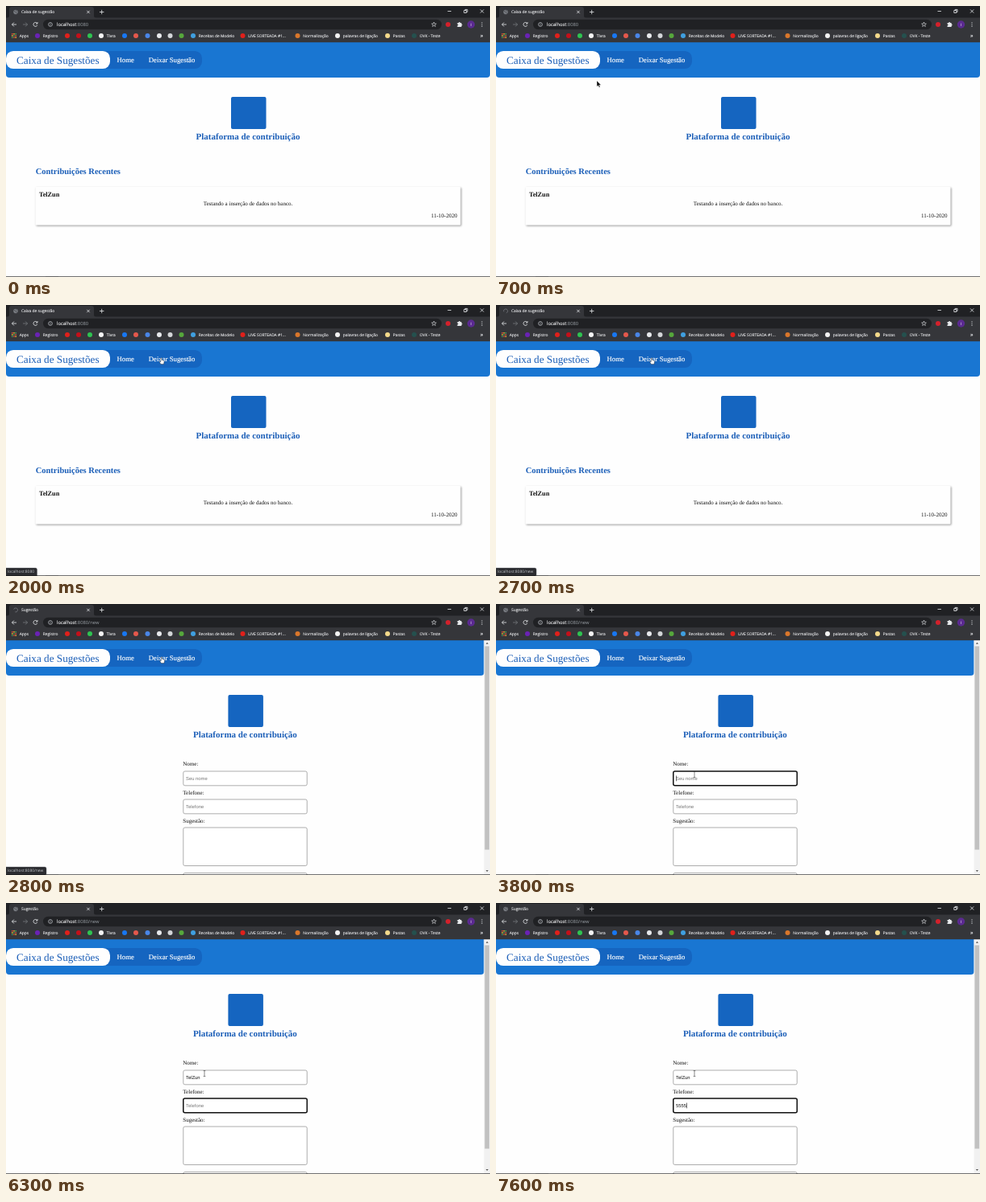
Recreate the animation shown at these times as an HTML page. Size 600 px wide and 337 px high, loop 8 s.

```html
<!DOCTYPE html>
<html lang="pt">
<head>
<meta charset="utf-8">
<style>
html, body { margin: 0; width: 100%; height: 100%; overflow: hidden; background: #fefefe; }
svg { display: block; width: 100%; height: 100%; }
text { font: 7.03px "Liberation Serif", "Times New Roman", serif; fill: #111; white-space: pre; text-rendering: geometricPrecision; }
.ui text { font: 4.9px "Open Sans", sans-serif; fill: #f1f2f4; stroke: #f1f2f4; stroke-width: .1; }
.ui .url { font-size: 5.8px; }
.ui .dim { fill: #9aa0a6; stroke: none; }
.line { fill: none; stroke: #e8eaed; stroke-width: .8; }
text.nav { font-size: 8.78px; fill: #fff; stroke: #fff; stroke-width: .15; }
text.brand { font-size: 13.2px; fill: #1c5fb8; }
text.title { font-size: 11px; font-weight: bold; fill: #1c5fb8; text-anchor: middle; }
text.sub { font-size: 10.5px; font-weight: bold; fill: #1c5fb8; }
text.name { font-size: 8.2px; font-weight: bold; }
.card { fill: #fefefe; filter: drop-shadow(1.5px 1.5px 1.2px #0006); }
.box { fill: #fff; stroke: #999; stroke-width: .8; }
.box.on { stroke: #101010; stroke-width: 1.5; }
text.val { font: 5.86px "Liberation Sans", Arial, sans-serif; fill: #111; }
text.val.empty { fill: #777; }
</style>
</head>
<body>
<svg viewBox="0 0 600 337" preserveAspectRatio="none">
  <rect width="600" height="337" fill="#fefefe"/>

  <!-- page header -->
  <path id="bar" fill="#1976d2"/>
  <rect x="110" y="55.9" width="133" height="22.2" rx="9" fill="#1565c0"/>
  <rect y="55.9" width="129" height="22.2" rx="9" fill="#fefefe"/>
  <text class="brand" x="13" y="71.6">Caixa de Sugestões</text>
  <text class="nav" x="137.5" y="70.4">Home</text>
  <text class="nav" x="176.7" y="70.4">Deixar Sugestão</text>
  <g id="hero">
    <rect x="279" y="113" width="43.5" height="40" rx="2" fill="#1565c0"/>
    <text class="title" x="300" y="166.3">Plataforma de contribuição</text>
  </g>

  <g id="home">
    <text class="sub" x="36.7" y="209">Contribuições Recentes</text>
    <rect class="card" x="36.5" y="225" width="527" height="47.5" rx="1"/>
    <text class="name" x="41" y="236.5">TelZun</text>
    <text x="300" y="248.4" text-anchor="middle">Testando a inserção de dados no banco.</text>
    <text x="559.5" y="263.4" text-anchor="end">11-10-2020</text>
  </g>

  <g id="form">
    <text x="219.3" y="201.4">Nome:</text>
    <text x="219.3" y="236.5">Telefone:</text>
    <text x="219.3" y="271.5">Sugestão:</text>
    <rect class="box" id="box0" x="219.8" y="208" width="153.4" height="17.8" rx="2"/>
    <rect class="box" id="box1" x="219.8" y="243" width="153.4" height="17.8" rx="2"/>
    <rect class="box" x="219.8" y="278" width="153.4" height="47.5" rx="2"/>
    <rect class="box" x="219.8" y="334.5" width="153.4" height="18" rx="2"/>
    <text class="val" id="val0" x="223" y="218.9"></text>
    <text class="val" id="val1" x="223" y="254"></text>
    <rect id="caret" width=".6" height="6.8" fill="#111"/>
    <rect x="592.6" y="45" width="7.4" height="292" fill="#f1f1f1"/>
    <rect x="593.5" y="52.5" width="5.6" height="253" fill="#c1c1c1"/>
    <path d="M594.8 49.7l1.6-2 1.6 2zM594.8 331l1.6 2 1.6-2z" fill="#555"/>
  </g>

  <!-- browser window -->
  <g class="ui">
    <rect width="600" height="15" fill="#202124"/>
    <rect y="14.5" width="600" height="30.7" fill="#35363a"/>
    <path d="M1 15q3 0 3-3V4q0-3 3-3h99q3 0 3 3v8q0 3 3 3z" fill="#35363a"/>
    <circle id="globe" cx="12" cy="7.5" r="2.8" fill="#777a80"/>
    <path id="shine" d="M10 6l4 3.4M12 5l1.6 1.6" class="line" style="stroke:#45474b"/>
    <path id="spin" d="M12 5a2.5 2.5 0 1 1-2.5 2.5" class="line" style="stroke:#6d7075"/>
    <text id="tab" x="19" y="9.2"></text>
    <path class="line" d="M100.3 5.8l3.4 3.4m0-3.4l-3.4 3.4M116 7.5h5.4m-2.7-2.7v5.4M547.5 6.5h4.4M588 4.4l4.2 4.2m0-4.2L588 8.6M567.8 5.5h3v3h-3zM569 5.4v-1h3v3h-1"/>
    <rect x="46" y="16.8" width="494" height="12.4" rx="6.2" fill="#202124"/>
    <path class="line" d="M13 23H7.5m2.4-2.5L7.4 23l2.5 2.5M38.6 21.6a2.5 2.5 0 1 0 .2 2.2M39 20v2h-2"/>
    <path class="line" style="stroke:#777a7f" d="M21 23h5.5m-2.4-2.5l2.5 2.5-2.5 2.5"/>
    <circle class="line" cx="55" cy="23" r="2.4" style="stroke:#b4b8bd"/>
    <path class="line" d="M55 22.7v1.5m0-2.8v.6" style="stroke:#b4b8bd"/>
    <text class="url" x="63" y="25.1">localhost<tspan class="dim" id="path"></tspan></text>
    <path class="line" d="M530.5 20l.8 2 2.1.1-1.7 1.3.6 2.1-1.8-1.2-1.8 1.2.6-2.1-1.7-1.3 2.1-.1z" style="stroke-width:.6"/>
    <circle cx="548" cy="23" r="3" fill="#d4212b"/>
    <path d="M559.5 21h1.6a1 1 0 0 1 2 0h1.5v1.6a1 1 0 0 1 0 2V26h-5.1v-1.5a1 1 0 0 0 0-2z" fill="#e8eaed"/>
    <circle cx="576.5" cy="23" r="4.7" fill="#5b2a91"/>
    <text x="575.9" y="24.6" style="font-size:4.4px">I</text>
    <g fill="#e8eaed"><circle cx="590" cy="20.8" r=".6"/><circle cx="590" cy="23" r=".6"/><circle cx="590" cy="25.2" r=".6"/></g>
    <g id="marks"></g>
    <text x="588" y="39" style="font-size:7px">»</text>
  </g>

  <g id="status" class="ui">
    <path id="statusBox" fill="#2b2c30" stroke="#55575b" stroke-width=".4"/>
    <text x="2" y="333.4" id="link" style="fill:#c3c6ca;stroke:none"></text>
  </g>
  <rect y="336.4" width="600" height=".6" fill="#141414"/>
  <rect x="49" y="336.4" width="16" height=".6" fill="#5a5a5a"/>

  <g id="arrow"><path d="M0 0V7.2L1.7 5.7 2.9 8.2 4 7.7 2.9 5.2H5.2Z" fill="#111" stroke="#fff" stroke-width=".3"/></g>
  <g id="hand"><path d="M-.7 0q.7-.8 1.3 0V2.6l2.4.6q.7.2.6 1L3 7.6H-.6L-2.4 4.6q.3-.9 1.7.2z" fill="#fff" stroke="#222" stroke-width=".4"/></g>
  <g id="beam"><path d="M-1.3-3.5h1.1l.2.3.2-.3h1.1M0-3.2v6.4M-1.3 3.5h1.1l.2-.3.2.3h1.1" fill="none" stroke="#333" stroke-width=".6"/></g>
</svg>
<script>
const $ = id => document.getElementById(id);
const show = (id, on) => $(id).style.display = on ? '' : 'none';

// Bookmarks: icon centre, colour, label
const marks = [
  [39, '#6a22b5', 'Registro'], [76, '#e0201b'], [90, '#c4101a'], [104, '#2fc351'],
  [118, '#f2f2f2', 'Tivra'], [147, '#1877f2'], [161, '#e4584c'], [175.5, '#4a86e8'],
  [190, '#e8eaed'], [203.5, '#d4d6d9'], [217.5, '#56a83c'],
  [232, '#3f9fe0', 'Receitas de Modelo'], [293.5, '#e0201b', 'LIVE SORTEADA #1...'],
  [361.5, '#d9772b', 'Normalização'], [411, '#f2f2f2', 'palavras de ligação'],
  [473, '#f3d98b', 'Pastas'], [506, '#25504e', 'OVK - Teste']
];
let html = '<text x="16.7" y="38.8">Apps</text>';
const dots = ['#e8453c', '#f3b42c', '#3fa45b'];
for (let i = 0; i < 9; i++)
  html += `<rect x="${7 + i % 3 * 2.2}" y="${34 + (i / 3 | 0) * 2.2}" width="1.5" height="1.5" fill="${dots[(i + (i / 3 | 0)) % 3]}"/>`;
for (const [x, color, label = ''] of marks)
  html += `<circle cx="${x}" cy="37" r="3" fill="${color}"/><text x="${x + 6.8}" y="38.8">${label}</text>`;
$('marks').innerHTML = html;

// Pointer stops: time, x, y
const stops = [[0, 300, 350], [100, 268, 252], [700, 125, 93], [1000, 127, 88],
  [1300, 146, 68], [1800, 152, 67], [2000, 192.5, 66], [2800, 193, 66], [3500, 246, 212]];
function pointer(t) {
  const i = stops.findIndex(s => s[0] > t);
  if (i < 0) return stops[stops.length - 1].slice(1);
  const [t0, x0, y0] = stops[i - 1], [t1, x1, y1] = stops[i];
  const u = (t - t0) / (t1 - t0), e = u * u * (3 - 2 * u);
  return [x0 + (x1 - x0) * e, y0 + (y1 - y0) * e];
}

const fields = [
  { hint: 'Seu nome', text: 'TelZun', focus: 3800, blur: 5800, keys: [4400, 4700, 4800, 5200, 5400, 5600] },
  { hint: 'Telefone', text: '5555', focus: 5800, blur: 1e9, keys: [7200, 7400, 7500, 7600] }
];
function drawField(f, i, t) {
  const typed = f.keys.filter(k => k <= t).length, val = $('val' + i);
  val.textContent = typed ? f.text.slice(0, typed) : f.hint;
  val.classList.toggle('empty', !typed);
  const on = t >= f.focus && t < f.blur;
  $('box' + i).classList.toggle('on', on);
  if (!on) return;
  const last = typed ? f.keys[typed - 1] : f.focus;
  show('caret', (t - last) % 1100 < 500);
  $('caret').setAttribute('x', typed ? 223.2 + val.getComputedTextLength() : 223);
  $('caret').setAttribute('y', 213.5 + 35 * i);
}

function draw(t) {
  const form = t >= 2800, loading = t >= 2600 && t < 3000;
  show('home', !form);
  show('form', form);
  $('hero').setAttribute('transform', `translate(${form ? -3.6 : 0})`);
  $('bar').setAttribute('d', `M0 45H${form ? 592.6 : 600}v40q0 4-4 4H4q-4 0-4-4z`);
  $('tab').textContent = form ? 'Sugestão' : 'Caixa de sugestão';
  $('path').textContent = form ? ':8080/new' : ':8080';
  show('globe', !loading);
  show('shine', !loading);
  show('spin', loading);
  $('spin').setAttribute('transform', `rotate(${t * .36} 12 7.5)`);

  const longLink = t >= 2100;
  show('status', t >= 1200 && t < 3100);
  $('link').textContent = longLink ? 'localhost:8080/new' : 'localhost:8080';
  $('statusBox').setAttribute('d', `M0 327h${longLink ? 48 : 36.5}q2 0 2 2v8H0z`);

  show('caret', false);
  fields.forEach((f, i) => drawField(f, i, t));

  const [x, y] = pointer(t);
  const kind = y > 56 && y < 78 && x > 129 && x < 243 ? 'hand'
    : form && x > 219 && y > 208 ? 'beam' : 'arrow';
  for (const k of ['arrow', 'hand', 'beam']) show(k, k === kind);
  $(kind).setAttribute('transform', `translate(${x} ${y})`);
}

const start = performance.now();
function tick() {
  const t = (performance.now() - start) % 8000;
  draw(Math.floor(t / 100) * 100);
  requestAnimationFrame(tick);
}
tick();
</script>
</body>
</html>
```
